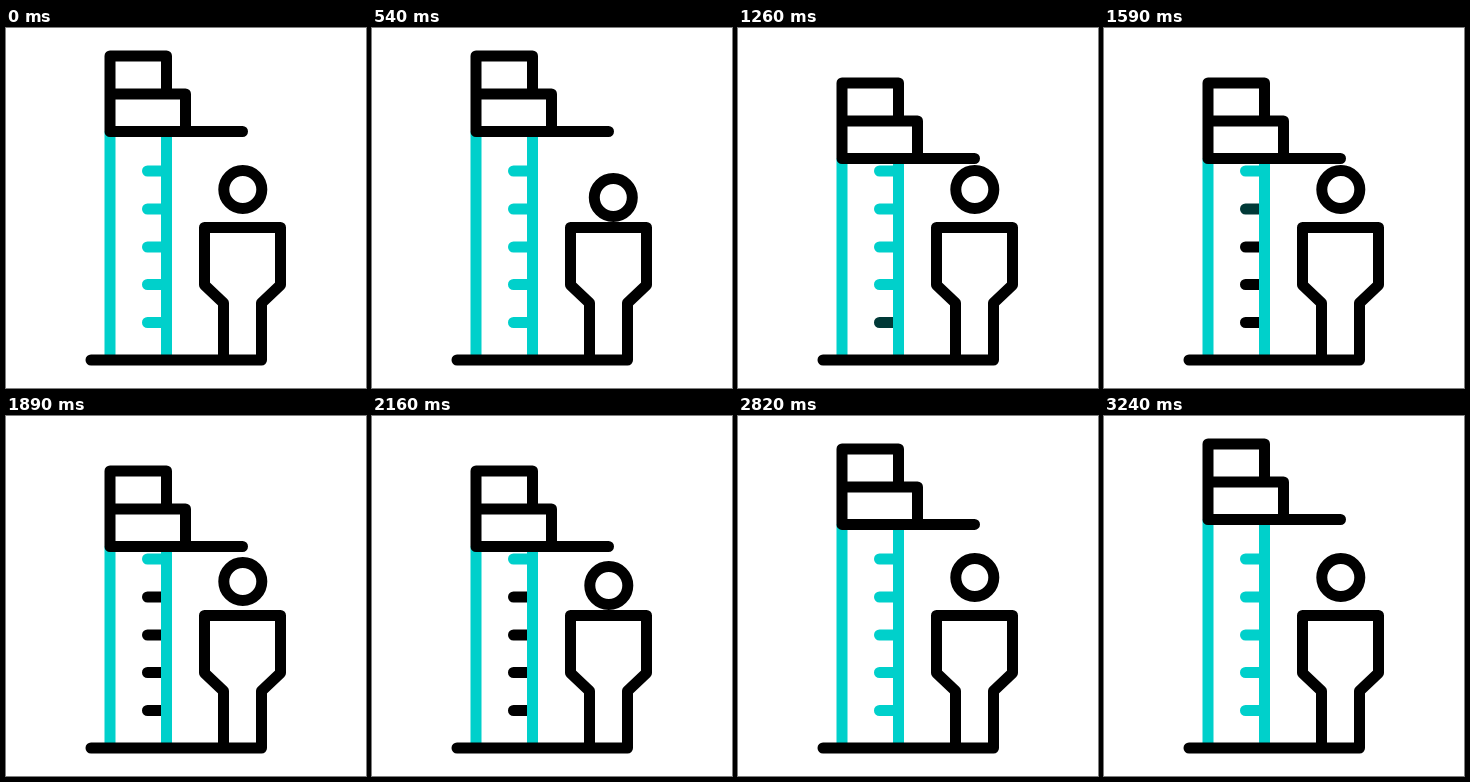
An HTML page for the animation above (3270 ms loop, 360 by 360 pixels).

```html
<!DOCTYPE html>
<html lang="en">
<head>
<meta charset="utf-8">
<title>Height measure</title>
<style>
  html, body { margin: 0; width: 100%; height: 100%; overflow: hidden; background: #fff; }
  svg { display: block; width: 100vw; height: 100vh; }
  g, path, circle { fill: none; stroke-width: 11; stroke-linecap: round; stroke-linejoin: round; }
  .ink { stroke: #000; }
  .teal { stroke: #00d0cb; }
  #rails { stroke-linecap: butt; }
</style>
</head>
<body>
<svg viewBox="0 0 360 360">
  <g id="ticks"></g>
  <path id="rails" class="teal"/>
  <g class="ink">
    <path id="slider" d="M104 66V28H160.5V66M104 66H179.5V103.5M104 66V103.5H236.5"/>
    <circle id="head" cx="236.8" cy="161.5" r="19"/>
    <path d="M217.5 332V275L198.5 257V199.5H274.5V257L255.5 275V332M85 332H255.5"/>
  </g>
</svg>
<script>
const LOOP = 3270;
const DROP = 27;
const TEAL = [0, 208, 203];
const $ = id => document.getElementById(id);

// Tracks are [time, value] steps, eased between neighbours.
const sliderY = [[770, 0], [1165, DROP], [2534, DROP], [2934, 0]];
const headX = [[270, 0], [510, 4.5], [570, 4.5], [810, 0]];
const headY = [[60, 0], [330, 8], [690, 8], [930, 0], [1740, 0], [2040, 8], [2220, 8], [2490, 0]];

const ticks = [143, 181, 219, 256.5, 294.5].map((y, i) => {
  const el = document.createElementNS("http://www.w3.org/2000/svg", "path");
  el.setAttribute("d", `M141.5 ${y}H160`);
  $("ticks").append(el);
  const on = 1500 - (i - 1) * 110;
  const off = 2230 + (i - 1) * 110;
  const dark = i ? [[on, 0], [on + 140, 1], [off, 1], [off + 130, 0]] : [[0, 0]];
  return { el, dark };
});

const ease = u => (1 - Math.cos(Math.PI * u)) / 2;

function at(track, t) {
  const next = track.findIndex(step => step[0] > t);
  if (next === 0) return track[0][1];
  if (next < 0) return track[track.length - 1][1];
  const [t0, a] = track[next - 1];
  const [t1, b] = track[next];
  return a + (b - a) * ease((t - t0) / (t1 - t0));
}

function draw(t) {
  const y = at(sliderY, t);
  $("slider").setAttribute("transform", `translate(0 ${y})`);
  $("rails").setAttribute("d", `M104 ${103.5 + y}V327M160.5 ${103.5 + y}V327`);
  $("head").setAttribute("transform", `translate(${at(headX, t)} ${at(headY, t)})`);
  for (const { el, dark } of ticks) {
    const light = 1 - at(dark, t);
    el.style.stroke = `rgb(${TEAL.map(c => Math.round(c * light))})`;
  }
}

const start = performance.now();
function frame() {
  draw((performance.now() - start) % LOOP);
  requestAnimationFrame(frame);
}
frame();
</script>
</body>
</html>
```
